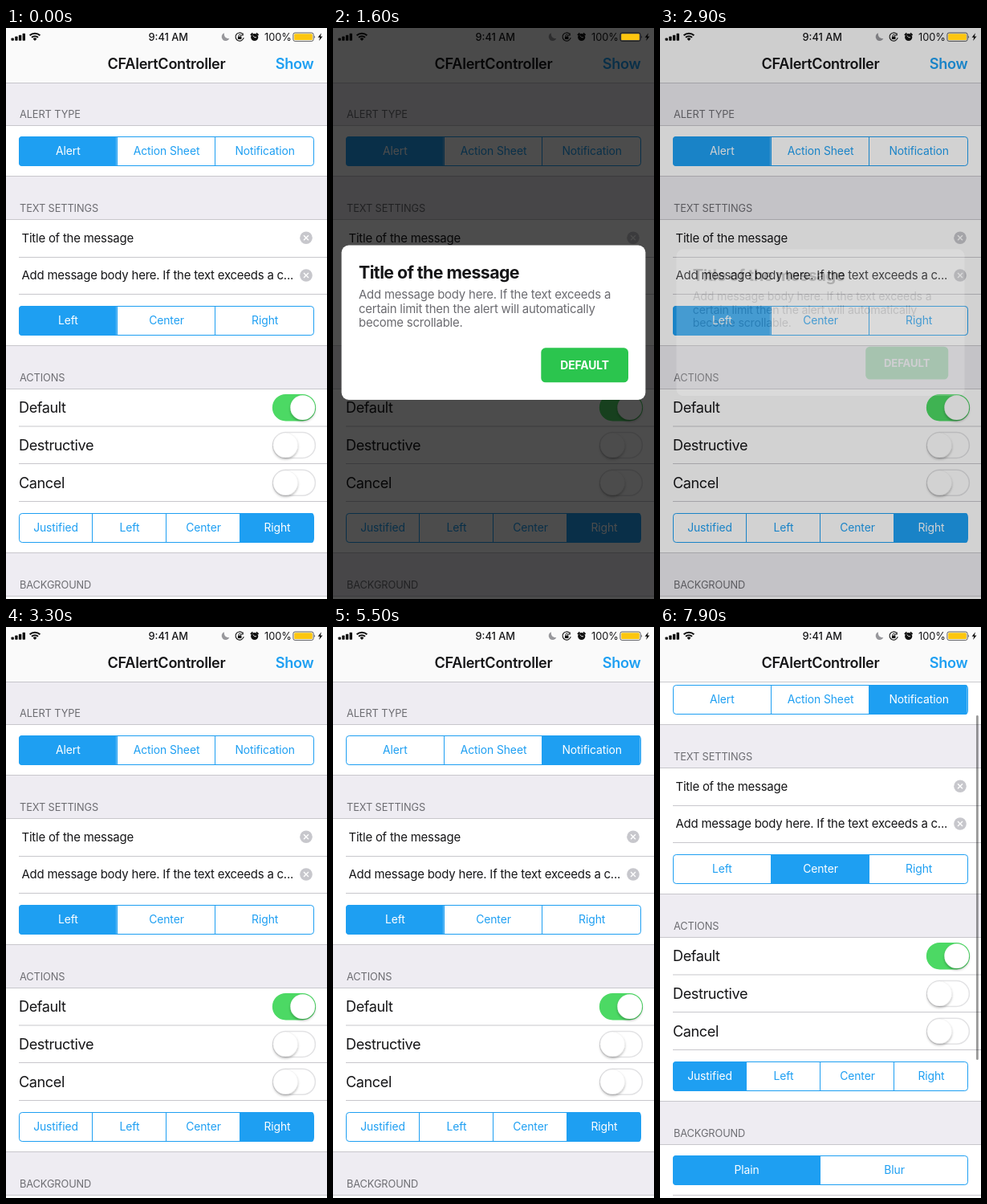
Animation of 400x711 px, one loop 8 s. Source, as an HTML page:

```html
<!DOCTYPE html>
<html lang="en">
<head>
<meta charset="utf-8">
<title>Alert settings</title>
<style>
  html, body { margin: 0; width: 100%; height: 100%; overflow: hidden; background: #fff; }
  svg { display: block; width: 100vw; height: 100vh; }
  text { font-family: Inter, Roboto, "Liberation Sans", sans-serif; fill: #151517; }
  .nav { font-size: 18.13px; font-weight: 600; letter-spacing: -.3px; }
  .status { font-size: 12.8px; font-weight: 500; }
  .head { font-size: 12.8px; letter-spacing: -.1px; fill: #6d6d72; }
  .field { font-size: 14.93px; letter-spacing: -.21px; }
  .row { font-size: 18.13px; letter-spacing: -.42px; }
  .seg { font-size: 13.87px; letter-spacing: -.07px; text-anchor: middle; }
  .title { font-size: 21.33px; font-weight: 700; letter-spacing: -.58px; }
  .body { font-size: 14.93px; letter-spacing: -.21px; fill: #6b6b70; }
  .button { font-size: 13.87px; font-weight: 700; letter-spacing: -.1px; text-anchor: middle; fill: #fff; }
</style>
</head>
<body>
<svg id="stage" viewBox="0 0 400 711" preserveAspectRatio="none"></svg>
<script>
const LOOP = 8000, BLUE = '#1e9ff2', LINE = '#c8c7cc';
const stage = document.getElementById('stage');

function add(parent, tag, attrs = {}, text) {
  const el = document.createElementNS('http://www.w3.org/2000/svg', tag);
  for (const key in attrs) el.setAttribute(key, attrs[key]);
  if (text !== undefined) el.textContent = text;
  parent.appendChild(el);
  return el;
}
const rect = (p, x, y, width, height, fill, more) => add(p, 'rect', { x, y, width, height, fill, ...more });
const circle = (p, cx, cy, r, fill, more) => add(p, 'circle', { cx, cy, r, fill, ...more });
const path = (p, d, more) => add(p, 'path', { d, fill: 'none', ...more });
const label = (p, cls, x, y, text, more) => add(p, 'text', { class: cls, x, y, ...more }, text);

const defs = add(stage, 'defs');
const shadow = add(defs, 'filter', { id: 'shadow', x: '-30%', y: '-30%', width: '160%', height: '170%' });
add(shadow, 'feDropShadow', { dx: 0, dy: 2, stdDeviation: 1.8, 'flood-color': '#000', 'flood-opacity': .28 });

// Segmented control; returns a function that selects one segment.
function segments(parent, y, names) {
  const id = 'clip' + y, w = 368 / names.length;
  const edge = i => Math.floor(15.5 + w * i);
  const clip = add(defs, 'clipPath', { id });
  rect(clip, 16, y, 368, 37, '#000', { rx: 4 });
  const marker = rect(parent, 16, y, w, 37, BLUE, { 'clip-path': `url(#${id})` });
  names.slice(1).forEach((_, i) => rect(parent, edge(i + 1), y, 1, 37, BLUE));
  rect(parent, 16.5, y + .5, 367, 36, 'none', { rx: 3.7, stroke: BLUE });
  const texts = names.map((name, i) => label(parent, 'seg', 16 + w * (i + .5), y + 23.4, name));
  return selected => {
    marker.setAttribute('x', edge(selected));
    texts.forEach((t, i) => { t.style.fill = i === selected ? '#fff' : BLUE; });
  };
}

function section(y, bottom, name, nameY) {
  rect(content, 0, y, 400, bottom - y, '#fff');
  rect(content, 0, y, 400, 1, LINE);
  rect(content, 0, bottom, 400, 1, LINE);
  label(content, 'head', 17, nameY, name);
}
const divider = y => rect(content, 16, y, 384, 1, LINE);

function field(y, text) {
  label(content, 'field', 19.5, y + 5.3, text);
  circle(content, 374, y, 7.8, '#c7c7cc');
  path(content, `M371 ${y - 3}l6 6m0 -6l-6 6`, { stroke: '#fff', 'stroke-width': 1.4 });
}

function toggleRow(y, text, on) {
  label(content, 'row', 16, y + 6.4, text);
  rect(content, 332.6, y - 16, 52.8, 32, on ? '#4cd964' : '#fff',
    { rx: 16, stroke: on ? '#4cd964' : '#e2e2e4', 'stroke-width': 1.5 });
  circle(content, on ? 369.7 : 348.3, y, 15.4, '#fff',
    { filter: 'url(#shadow)', stroke: '#000', 'stroke-opacity': .08, 'stroke-width': .5 });
}

// Scrolling settings form
rect(stage, 0, 0, 400, 711, '#eeecf2');
const content = add(stage, 'g');
section(121, 184, 'ALERT TYPE', 111.6);
const alertType = segments(content, 135, ['Alert', 'Action Sheet', 'Notification']);

section(238, 395, 'TEXT SETTINGS', 228.6);
field(261.2, 'Title of the message');
divider(285);
field(308, 'Add message body here. If the text exceeds a c...');
divider(331);
const textAlign = segments(content, 346, ['Left', 'Center', 'Right']);

section(449, 653, 'ACTIONS', 439.6);
toggleRow(472.7, 'Default', true);
divider(495.5);
toggleRow(519.5, 'Destructive', false);
divider(542);
toggleRow(566.3, 'Cancel', false);
divider(589);
const actionAlign = segments(content, 604, ['Justified', 'Left', 'Center', 'Right']);

section(707, 900, 'BACKGROUND', 697.6);
segments(content, 721, ['Plain', 'Blur'])(0);
divider(770);

const scrollbar = rect(stage, 394, 71, 2.8, 429, '#000', { rx: 1.4 });

// Navigation and status bar
rect(stage, 0, 0, 400, 68, '#fafafa');
rect(stage, 0, 68, 400, .7, '#b5b5ba');
label(stage, 'nav', 200, 51.3, 'CFAlertController', { 'text-anchor': 'middle' });
const show = label(stage, 'nav', 335.8, 51.3, 'Show', { style: `fill:${BLUE}` });

for (let i = 0; i < 4; i++) rect(stage, 6.5 + i * 4.7, 12.5 - i * 1.9, 3.4, 3.3 + i * 1.9, '#111', { rx: .7 });
path(stage, 'M29.6 9.3a9 9 0 0 1 12.8 0M32 11.8a5.7 5.7 0 0 1 8 0', { stroke: '#111', 'stroke-width': 2 });
path(stage, 'M33.6 13.4a3.4 3.4 0 0 1 4.8 0l-2.4 2.6z', { style: 'fill:#111' });
label(stage, 'status', 202.2, 15.6, '9:41 AM', { 'text-anchor': 'middle' });
path(stage, 'M272 6.3a5 5 0 1 0 6.3 6.6a5.3 5.3 0 0 1 -6.3 -6.6z', { style: 'fill:#98989c' });
path(stage, 'M294.8 7.4a5.1 5.1 0 1 0 1.4 4.6m-1 -5.6v2.6h-2.6', { stroke: '#111', 'stroke-width': 1.1 });
rect(stage, 288.9, 10.4, 4.6, 3.6, '#111', { rx: .5 });
path(stage, 'M289.9 10.5v-1a1.3 1.3 0 0 1 2.6 0v1', { stroke: '#111', 'stroke-width': .9 });
circle(stage, 309.7, 11.5, 4.6, '#111');
path(stage, 'M304.8 8.8l2.6 -2.4m7.2 2.4l-2.6 -2.4', { stroke: '#111', 'stroke-width': 1.7 });
path(stage, 'M307.8 9.5l1.9 2.2h2.3', { stroke: '#fff', 'stroke-width': .9 });
label(stage, 'status', 322, 15.6, '100%', { style: 'font-weight:400' });
rect(stage, 357.9, 6, 25.2, 10.4, '#fff', { rx: 2.2, stroke: '#333', 'stroke-width': .8 });
path(stage, 'M384.3 9.3q1.8 1.9 0 3.8z', { style: 'fill:#333' });
path(stage, 'M393 6.3l-4.4 5.5h2.6l-1.1 4.2l4.4 -5.6h-2.6z', { style: 'fill:#111' });

const dim = rect(stage, 0, 0, 400, 711, '#000');
rect(stage, 359.2, 7.3, 22.6, 7.8, '#fdc60f', { rx: 1.2 });

// Alert card
const card = add(stage, 'g');
rect(card, 10.6, 270.3, 378.8, 192.4, '#fff', { rx: 9 });
label(card, 'title', 32, 311.8, 'Title of the message');
['Add message body here. If the text exceeds a',
 'certain limit then the alert will automatically',
 'become scrollable.'].forEach((line, i) => label(card, 'body', 32, 337 + i * 17.6, line));
rect(card, 259.3, 398, 108.7, 43, '#2bc54e', { rx: 5.5 });
label(card, 'button', 313.6, 424.6, 'DEFAULT');

const ramp = (t, from, to) => Math.min(1, Math.max(0, (t - from) / (to - from)));
const ease = x => x * x * (3 - 2 * x);

function draw(t) {
  alertType(t < 4000 ? 0 : 2);
  textAlign(t < 5900 ? 0 : 1);
  actionAlign(t < 7000 ? 3 : 0);

  const scroll = 63 * ease(ramp(t, 7400, 7900));
  content.setAttribute('transform', `translate(0 ${-scroll})`);
  const flash = ramp(t, 3950, 4050) * (1 - ramp(t, 4700, 4950));
  scrollbar.setAttribute('y', 71 + scroll * .62);
  scrollbar.setAttribute('opacity', .4 * Math.max(flash, ramp(t, 7400, 7500)));

  // The tapped button fades back while the card appears.
  show.setAttribute('opacity', 1 - .8 * ramp(t, 1200, 1220) * (1 - ramp(t, 1300, 1500)));

  // The card shrinks into place, then keeps shrinking as it fades away.
  const shown = ease(ramp(t, 1250, 1550));
  const left = 1 - ease(ramp(t, 2720, 2990));
  const scale = 1 + .22 * (1 - shown) - .07 * (1 - left);
  card.setAttribute('transform', `translate(200 366.8) scale(${scale}) translate(-200 -366.5)`);
  card.setAttribute('opacity', Math.sqrt(shown) * left ** 1.2);
  dim.setAttribute('opacity', .7 * shown ** 1.5 * left);
}

const start = performance.now();
function tick() {
  draw((performance.now() - start) % LOOP);
  requestAnimationFrame(tick);
}
tick();
</script>
</body>
</html>
```
